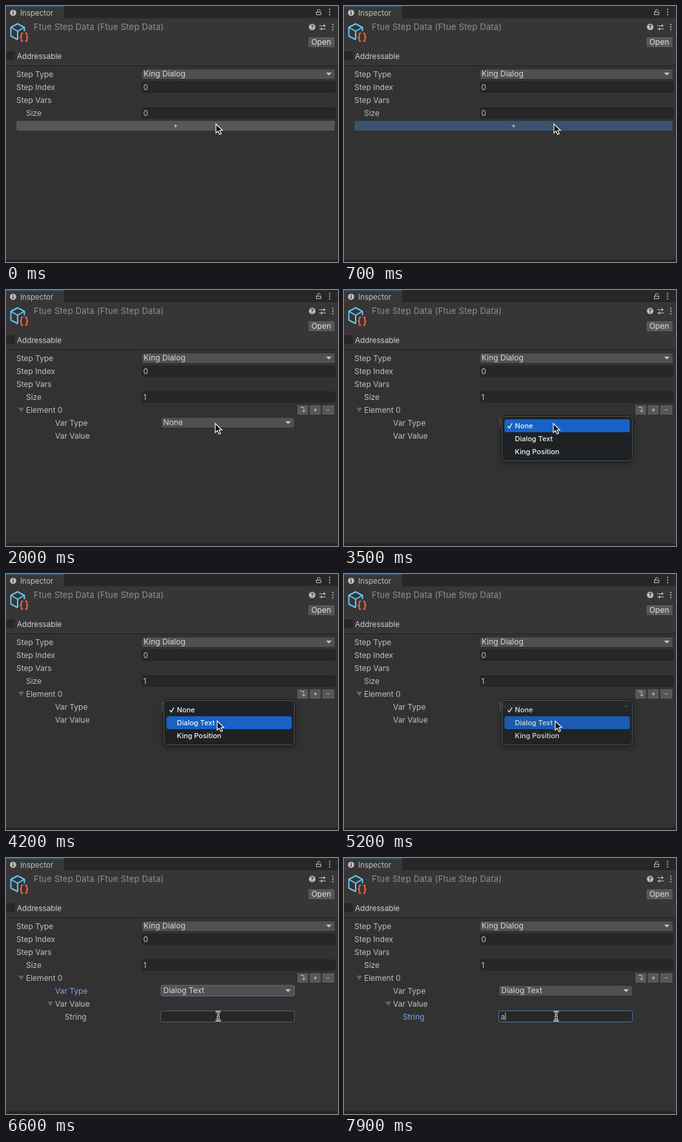
Recreate the animation shown at these times as an HTML page. Size 514 px wide and 396 px high, loop 8000 ms.

```html
<!DOCTYPE html>
<html lang="en">
<head>
<meta charset="utf-8">
<title>Inspector</title>
<style>
  html, body { margin: 0; width: 100%; height: 100%; overflow: hidden; background: #323232; }
  svg { display: block; width: 514px; height: 396px; font: 12px Inter, sans-serif; fill: #c0c0c0; }
  .field { fill: #272727; stroke: #222; }
  .drop { fill: #505050; stroke: #2d2d2d; }
  .btn { fill: #575757; stroke: #2d2d2d; }
  .fold { fill: #626262; }
  .line { fill: none; stroke: #c4c4c4; }
  .dim { font-size: 13px; letter-spacing: .22px; fill: #919191; }
  .menu { font-size: 11px; font-weight: 500; fill: #f2f2f2; }
  .focus { stroke: #4a76ae; }
  .hover { stroke: #5c5c5c; }
  text.active { fill: #78a3f2; }
</style>
</head>
<body>
<svg viewBox="0 0 514 396">
  <defs>
    <path id="down" d="M0 0h8.5l-4.250 4.500z"/>
    <path id="foldout" class="fold" d="M0 0h9l-4.500 7z"/>
    <path id="plus" class="line" d="M-2.500 0h5M0-2.500v5" stroke-width="1.200"/>
    <g id="dots"><circle cy="-4" r="1.1"/><circle r="1.1"/><circle cy="4" r="1.1"/></g>
    <path id="beamShape" d="M-4-7q4 0 4 2.500V4.500Q0 7-4 7M4-7q-4 0-4 2.500V4.500Q0 7 4 7M-2.500 2h5"/>
  </defs>

  <!-- window chrome -->
  <rect width="514" height="396" fill="#323232"/>
  <rect width="514" height="19" fill="#272727"/>
  <rect width="90" height="20" fill="#383637"/>
  <rect width="90" height="1.5" fill="#2c5577"/>
  <rect y="19" width="514" height="74" fill="#383536"/>
  <rect y="92" width="514" height="1" fill="#202020"/>
  <rect y="392" width="514" height="4" fill="#272324"/>

  <circle cx="11" cy="10.500" r="4.800"/>
  <path d="M11 7v1.600M11 9.600v4" stroke="#333" stroke-width="1.600"/>
  <text x="22" y="15" font-size="11.500">Inspector</text>
  <path class="line" d="M480.500 9.500h7v4h-7zM482 9.500V7.500a2.200 2.200 0 0 1 4.400 0"/>
  <use href="#dots" x="501" y="9.500"/>

  <!-- asset header -->
  <path d="M28.500 39V33L18 27.500 7.500 33V46.500L18 52M7.500 33L18 39 28.500 33M18 39V52"
    fill="none" stroke="#62c8f2" stroke-width="2" stroke-linejoin="round"/>
  <path d="M26.500 42h-1.200q-1.600 0-1.600 1.600v2.400q0 2-2 2.300 2 .3 2 2.300v2.400q0 1.600 1.600 1.600h1.200
    M29.500 42h1.200q1.600 0 1.600 1.600v2.400q0 2 2 2.300-2 .3-2 2.300v2.400q0 1.600-1.600 1.600h-1.200"
    fill="none" stroke="#f0643c" stroke-width="2"/>
  <text class="dim" x="43" y="37">Ftue Step Data (Ftue Step Data)</text>
  <circle cx="474" cy="32.500" r="5"/>
  <text x="474" y="35.800" font-size="9" font-weight="700" text-anchor="middle" style="fill:#383536">?</text>
  <path class="line" d="M485 30.500h10M485 35.500h10M492.500 28v5M488.500 33v5" stroke-width="1.200"/>
  <use href="#dots" x="506" y="32.500"/>
  <rect class="btn" x="467.500" y="47.500" width="42" height="17" rx="3"/>
  <text x="488" y="60" text-anchor="middle" style="fill:#e0e0e0">Open</text>
  <rect x="0" y="70" width="14" height="14" rx="2" fill="#282627"/>
  <text x="17" y="82" font-size="11.700" style="fill:#d0d0d0">Addressable</text>

  <!-- step properties -->
  <text x="16" y="110">Step Type</text>
  <rect class="drop" x="210.500" y="97.500" width="299" height="16" rx="2.500"/>
  <text x="213" y="109" style="fill:#d8d8d8">King Dialog</text>
  <use href="#down" x="495.500" y="103"/>
  <text x="16" y="130">Step Index</text>
  <rect class="field" x="210.500" y="117.500" width="299" height="16" rx="2.500"/>
  <text x="212.500" y="130">0</text>
  <text x="16" y="150">Step Vars</text>
  <text x="31" y="170">Size</text>
  <rect class="field" x="210.500" y="157.500" width="299" height="16" rx="2.500"/>
  <text id="size" x="212.500" y="170">0</text>

  <g id="add">
    <rect id="addButton" class="btn" x="15.500" y="177" width="494" height="16.500" rx="2.500"/>
    <use href="#plus" x="262.500" y="185.500"/>
  </g>

  <g id="element">
    <use href="#foldout" x="19" y="182"/>
    <text x="31" y="190">Element 0</text>
    <rect class="btn" x="450.500" y="177.500" width="18" height="16" rx="2"/>
    <rect class="btn" x="469.500" y="177.500" width="18.500" height="16" rx="2"/>
    <rect class="btn" x="489" y="177.500" width="20" height="16" rx="2"/>
    <path class="line" d="M456 181.500h5v7M458.500 186.500l2.500 2.500 2.500-2.500M496.500 185.500h4"/>
    <use href="#plus" x="479" y="185.500"/>
    <text id="typeLabel" x="76" y="210">Var Type</text>
    <rect id="typeBox" class="drop" x="240" y="197" width="206.500" height="16.500" rx="2.500"/>
    <text id="typeName" x="243.500" y="209" style="fill:#d8d8d8">None</text>
    <use href="#down" x="432.500" y="203"/>
    <text x="76" y="230">Var Value</text>
    <g id="value">
      <use href="#foldout" x="64" y="222"/>
      <text id="stringLabel" x="91" y="250">String</text>
      <rect id="stringBox" class="field" x="239.500" y="236.500" width="207" height="17" rx="2.500"/>
      <text id="typed" x="242.500" y="250"></text>
      <rect id="caret" y="239" width="1" height="12"/>
    </g>
  </g>

  <g id="popup">
    <rect x="243.500" y="194.500" width="204" height="71" rx="6.500" fill="#1e2224" stroke="#151515"
      style="filter:drop-shadow(0 3px 5px #0005)"/>
    <rect x="244.500" y="195.500" width="202" height="69" rx="5.500" fill="none" stroke="#56595a"/>
    <rect id="highlight" x="248.500" width="194" height="20" rx="3.500" fill="#1862c6"/>
    <path d="M253.500 210.500l2.500 3 4-7" fill="none" stroke="#f2f2f2" stroke-width="1.500"/>
    <g class="menu">
      <text x="264.500" y="214">None</text>
      <text x="264.500" y="234">Dialog Text</text>
      <text x="264.500" y="254">King Position</text>
    </g>
  </g>

  <path id="arrow" d="M.5 .5V14.500l3.300-3 2.300 5.300 2.600-1.100-2.300-5.200h4.300z" fill="#111" stroke="#f4f4f4" stroke-width="1.200"/>
  <g id="beam" fill="none">
    <use href="#beamShape" stroke="#f4f4f4" stroke-width="3"/>
    <use href="#beamShape" stroke="#111"/>
  </g>
</svg>

<script>
const LOOP = 8000, TICK = 100;
const $ = id => document.getElementById(id);
const show = (id, on) => $(id).style.display = on ? '' : 'none';
const move = (id, [x, y]) => $(id).setAttribute('transform', `translate(${x} ${y})`);

// Pointer moves: first tick, number of ticks, destination
const start = [324.5, 182];
const moves = [
  [1700, 4, [323.5, 206]],
  [4000, 3, [326.5, 227]],
  [6400, 3, [328.5, 244.5]],
];

function pointerAt(t) {
  let [x, y] = start;
  for (const [begin, ticks, [toX, toY]] of moves) {
    if (t < begin) break;
    const p = Math.min(1, ((t - begin) / TICK + 1) / ticks);
    const ease = p * p * (3 - 2 * p);
    x += (toX - x) * ease;
    y += (toY - y) * ease;
  }
  return [x, y];
}

function popupOpacity(t) {
  if (t < 3500 || t >= 5500) return 0;
  return t < 5200 ? 1 : [0.86, 0.5, 0.15][(t - 5200) / TICK];
}

function render(time) {
  const t = Math.floor(time % LOOP / TICK) * TICK;
  const added = t >= 800, chosen = t >= 5300, editing = t >= 7600, typed = t >= 7900;
  const overField = t >= 6500;
  const pointer = pointerAt(t);

  show('add', !added);
  show('element', added);
  $('addButton').style.fill = t >= 700 ? '#3a536c' : '';
  $('size').textContent = added ? 1 : 0;

  $('typeName').textContent = chosen ? 'Dialog Text' : 'None';
  $('typeLabel').classList.toggle('active', chosen && !editing);
  $('typeBox').classList.toggle('focus', chosen && !editing);
  show('value', chosen);

  $('stringLabel').classList.toggle('active', editing);
  $('stringBox').classList.toggle('hover', overField && !editing);
  $('stringBox').classList.toggle('focus', editing);
  $('typed').textContent = typed ? 'a' : '';
  $('caret').setAttribute('x', typed ? 249.5 : 243);
  show('caret', editing);

  $('popup').style.opacity = popupOpacity(t);
  $('highlight').setAttribute('y', t >= 4100 ? 220 : 200);

  show('arrow', !overField);
  show('beam', overField);
  move(overField ? 'beam' : 'arrow', pointer);
}

function loop() {
  render(performance.now());
  requestAnimationFrame(loop);
}
loop();
</script>
</body>
</html>
```
